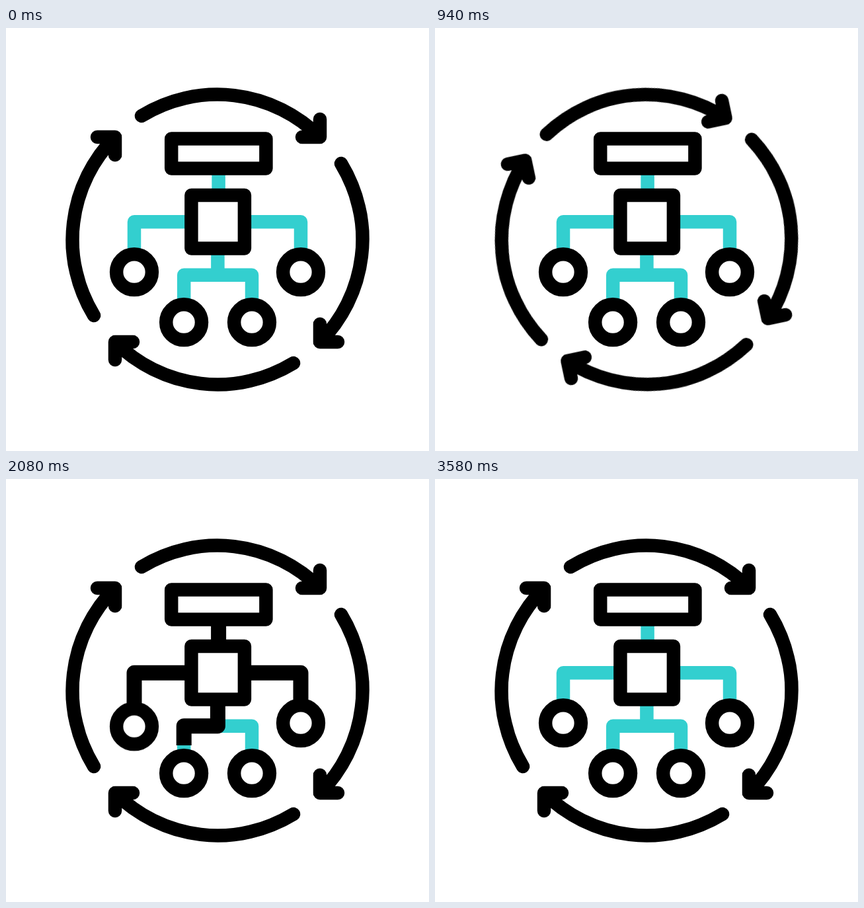
These frames come from a looping animation (640 by 640 pixels, 3.6 s). An HTML page:

```html
<!DOCTYPE html>
<html lang="en">
<head>
<meta charset="utf-8">
<title>Workflow cycle</title>
<style>
  html, body { margin: 0; width: 100%; height: 100%; overflow: hidden; background: #fff; }
  svg { display: block; width: 100vw; height: 100vh; }

  .ink { stroke: #000; stroke-width: 20.5; stroke-linejoin: round; }
  .arrow { fill: none; stroke-linecap: round; }
  .node { fill: #fff; }
  .link { fill: none; stroke: #33cfcf; stroke-width: 20.5; stroke-linejoin: round; }
  .trace { fill: none; stroke: #000; stroke-width: 23; stroke-linejoin: round; stroke-dasharray: 1 3; }

  .ring, .trace, .ball {
    animation-duration: 3600ms;
    animation-iteration-count: infinite;
    animation-timing-function: cubic-bezier(.333, 0, .667, 1);
  }
  .trace { animation-timing-function: linear; }

  /* wind up, spin three quarters, overshoot, settle */
  .ring { transform-origin: 320px 320px; animation-name: spin; }
  @keyframes spin {
    0% { transform: rotate(0deg); }
    9.167% { transform: rotate(-25deg); }
    30.694% { transform: rotate(295deg); }
    40%, 100% { transform: rotate(270deg); }
  }

  /* each circle dips when its line arrives */
  .ball { animation-name: dip; }
  @keyframes dip {
    0%, 11.111%, 100% { transform: translateY(0); }
    5.556% { transform: translateY(8px); }
  }

  /* black runs along each line, then clears from its root */
  @keyframes stem {
    0%, 27.78% { stroke-dashoffset: 1.01; }
    32.22%, 75% { stroke-dashoffset: 0; }
    77.78%, 100% { stroke-dashoffset: -1.01; }
  }
  @keyframes right {
    0%, 32.22% { stroke-dashoffset: 1.01; }
    41.11%, 77.78% { stroke-dashoffset: 0; }
    83.33%, 100% { stroke-dashoffset: -1.01; }
  }
  @keyframes left {
    0%, 41.11% { stroke-dashoffset: 1.01; }
    50%, 83.33% { stroke-dashoffset: 0; }
    88.89%, 100% { stroke-dashoffset: -1.01; }
  }
  @keyframes lowLeft {
    0%, 50% { stroke-dashoffset: 1.01; }
    58.89%, 88.89% { stroke-dashoffset: 0; }
    92.78%, 100% { stroke-dashoffset: -1.01; }
  }
  @keyframes lowRight {
    0%, 58.89% { stroke-dashoffset: 1.01; }
    67.78%, 92.78% { stroke-dashoffset: 0; }
    96.67%, 100% { stroke-dashoffset: -1.01; }
  }
</style>
</head>
<body>
<svg viewBox="0 0 640 640">
  <defs>
    <path id="arrow" d="M205 133A219.5 219.5 0 0 1 475 165M475 138V165H448"/>
  </defs>

  <g class="ring ink arrow">
    <use href="#arrow"/>
    <use href="#arrow" transform="rotate(90 320 320)"/>
    <use href="#arrow" transform="rotate(180 320 320)"/>
    <use href="#arrow" transform="rotate(270 320 320)"/>
  </g>

  <g class="link">
    <path d="M321.6 212V253"/>
    <path d="M361 293.3H446V345"/>
    <path d="M281 293.3H194V345"/>
    <path d="M320.4 333V373.7M269.2 420V373.7H372V420"/>
  </g>

  <path class="trace" pathLength="1" style="animation-name:stem" d="M321.6 212V253"/>
  <path class="trace" pathLength="1" style="animation-name:right" d="M361 293.3H446V345"/>
  <path class="trace" pathLength="1" style="animation-name:left" d="M281 293.3H194V345"/>
  <path class="trace" pathLength="1" style="animation-name:lowLeft" d="M320.4 333V373.7H269.2V420"/>
  <path class="trace" pathLength="1" style="animation-name:lowRight" d="M320.4 373.7H372V420"/>

  <g class="ink node">
    <rect x="250.2" y="167.4" width="143.2" height="45.1"/>
    <rect x="280.4" y="252.9" width="80.5" height="80.5"/>
    <circle class="ball" style="animation-delay:1480ms" cx="446" cy="369.2" r="26.9"/>
    <circle class="ball" style="animation-delay:1800ms" cx="194" cy="369.2" r="26.9"/>
    <circle class="ball" style="animation-delay:2120ms" cx="269.1" cy="445.2" r="26.9"/>
    <circle class="ball" style="animation-delay:2440ms" cx="372" cy="445.2" r="26.9"/>
  </g>
</svg>
</body>
</html>
```
